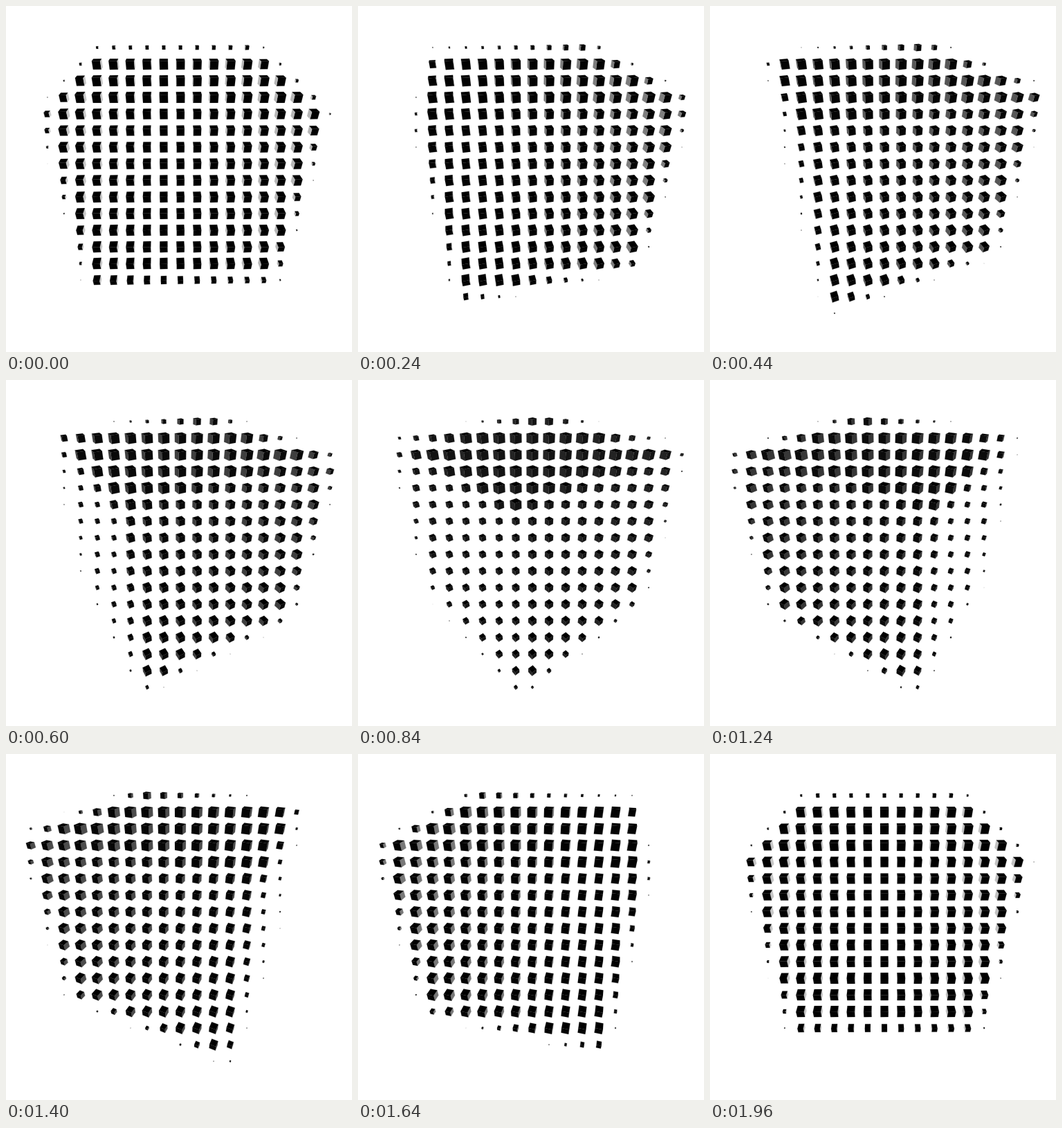
An HTML page with a canvas that plays this animation: 500 by 500 pixels, repeating every 2000 ms.

```html
<!DOCTYPE html>
<html lang="en">
<head>
<meta charset="utf-8">
<title>Cube of cubes</title>
<style>
  html, body { margin: 0; width: 100%; height: 100%; overflow: hidden; background: #fff; }
  canvas { display: block; width: 500px; height: 500px; }
</style>
</head>
<body>
<canvas id="stage" width="500" height="500"></canvas>
<script>
const LOOP = 2000, STEP = 40;
const SHUTTER = 0.6, SAMPLES = 6;
const SIZE = 500, MID = SIZE / 2, EYE = MID / Math.tan(Math.PI / 6);
const CELL = 24, COUNT = 21, SUB = 8;
const TILT = Math.atan(Math.SQRT1_2);
const TC = Math.cos(TILT), TS = Math.sin(TILT);
const SIDE = 0.92;
const NORMALS = [[0, 0, 1], [1, 0, 0], [0, 0, -1], [-1, 0, 0], [0, -1, 0], [0, 1, 0]];
const CORNERS = [[-1, -1], [1, -1], [1, 1], [-1, 1]];

function context(size, options) {
  const canvas = document.createElement('canvas');
  canvas.width = canvas.height = size;
  return canvas.getContext('2d', options);
}

const stage = document.getElementById('stage').getContext('2d');
const layer = context(SIZE);
const probe = context(COUNT * SUB, { willReadFrequently: true });

// Spin about the vertical axis, then tilt towards the viewer.
function turn([x, y, z], c, s) {
  const zz = z * c - x * s;
  return [x * c + z * s, y * TC + zz * TS, zz * TC - y * TS];
}

function project([x, y, z]) {
  const k = EYE / (EYE - z);
  return [MID + x * k, MID + y * k];
}

// Draws the visible faces; paint(facing) gives a grey from 0 to 255.
function drawBox(g, center, half, angle, paint) {
  const c = Math.cos(angle), s = Math.sin(angle);
  for (const n of NORMALS) {
    const u = [n[1], n[2], n[0]], v = [n[2], n[0], n[1]];
    const place = (a, b) =>
      turn(n.map((w, i) => (w + a * u[i] + b * v[i]) * half[i]), c, s)
        .map((w, i) => w + center[i]);
    const normal = turn(n, c, s), p = place(0, 0);
    const toEye = normal[2] * (EYE - p[2]) - normal[0] * p[0] - normal[1] * p[1];
    if (toEye <= 0) continue;

    const facing = n[1] ? 1 : SIDE * Math.max(0, n[2] * c - n[0] * s);
    const grey = Math.round(paint(facing));
    g.fillStyle = g.strokeStyle = `rgb(${grey},${grey},${grey})`;
    g.beginPath();
    for (const [a, b] of CORNERS) g.lineTo(...project(place(a, b)));
    g.closePath();
    g.fill();
    g.stroke();
  }
}

// Average strength of the large cube inside every grid cell.
function sampleCells(angle) {
  const size = COUNT * SUB, k = SUB / CELL;
  probe.setTransform(1, 0, 0, 1, 0, 0);
  probe.fillStyle = '#000';
  probe.fillRect(0, 0, size, size);
  probe.setTransform(k, 0, 0, k, 0, 0);
  probe.lineWidth = 0.3;
  drawBox(probe, [2, -30.5, 1.7], [123.5, 120.5, 123.5], angle, f => 255 * f);

  const data = probe.getImageData(0, 0, size, size).data;
  const cells = new Float32Array(COUNT * COUNT);
  for (let y = 0; y < size; y++) {
    for (let x = 0; x < size; x++) {
      const cell = Math.floor(y / SUB) * COUNT + Math.floor(x / SUB);
      cells[cell] += data[(y * size + x) * 4] / (255 * SUB * SUB);
    }
  }
  return cells;
}

const shade = f => 199 * Math.pow(1 - f, 1.9);

function drawGrid(angle) {
  layer.fillStyle = '#fff';
  layer.fillRect(0, 0, SIZE, SIZE);
  layer.lineWidth = 0.15;
  sampleCells(angle).forEach((strength, i) => {
    if (strength < 0.02) return;
    const x = (i % COUNT + 0.5) * CELL - MID;
    const y = (Math.floor(i / COUNT) + 0.5) * CELL - MID;
    const half = strength * CELL / 4;
    drawBox(layer, [x, y, 0], [half, half, half], angle, shade);
  });
}

// Motion blur: the mean of several moments while the shutter is open.
function draw(time) {
  for (let i = 0; i < SAMPLES; i++) {
    const moment = time + STEP * (1 + SHUTTER * i / SAMPLES);
    drawGrid(moment / LOOP * Math.PI / 2);
    stage.globalAlpha = 1 / (i + 1);
    stage.drawImage(layer.canvas, 0, 0);
  }
}

const start = performance.now();
let shown = -1;
function tick() {
  const elapsed = (performance.now() - start) % LOOP;
  const time = Math.floor(elapsed / STEP) * STEP;
  if (time !== shown) draw(shown = time);
  requestAnimationFrame(tick);
}
tick();
</script>
</body>
</html>
```
